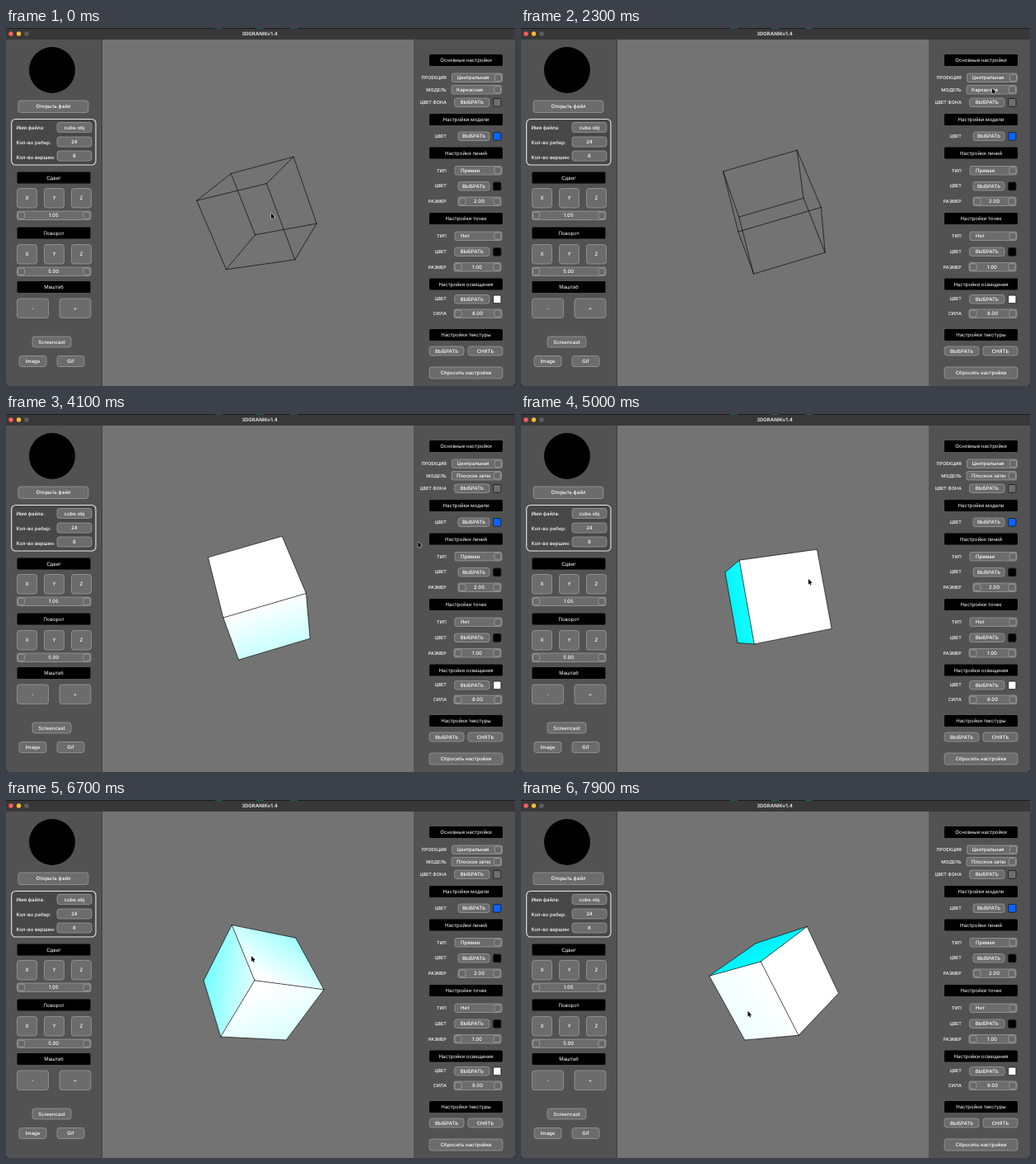
An HTML page with a canvas for the animation above (8000 ms loop, 618 by 434 pixels).

```html
<!DOCTYPE html>
<html lang="ru">
<head>
<meta charset="utf-8">
<title>3DGRANIKv1.4</title>
<style>
html, body { margin: 0; width: 100%; height: 100%; overflow: hidden; background: #1d1d1d; }
canvas { display: block; width: 618px; height: 434px; }
</style>
</head>
<body>
<canvas id="stage"></canvas>
<script>
const W = 618, H = 434, LOOP = 8000, STEP = 100;
const canvas = document.getElementById('stage');
const ctx = canvas.getContext('2d');
const ratio = window.devicePixelRatio || 1;
canvas.width = W * ratio;
canvas.height = H * ratio;
ctx.textRendering = 'geometricPrecision';

const POPUP_OPEN = 2500, POPUP_CLOSE = 3500;

// ---------- basic drawing ----------
function box(x0, y0, x1, y1, r, fill, line, width = 0.7) {
  ctx.beginPath();
  ctx.roundRect(x0, y0, x1 - x0, y1 - y0, r);
  if (fill) { ctx.fillStyle = fill; ctx.fill(); }
  if (line) { ctx.strokeStyle = line; ctx.lineWidth = width; ctx.stroke(); }
}

function disc(x, y, r, fill) {
  ctx.beginPath();
  ctx.arc(x, y, r, 0, 7);
  ctx.fillStyle = fill;
  ctx.fill();
}

function text(s, x, y, { size = 6, align = 'center', color = '#fff', weight = 500 } = {}) {
  ctx.font = `${weight} ${size}px Inter, "Open Sans", sans-serif`;
  ctx.textAlign = align;
  ctx.textBaseline = 'alphabetic';
  ctx.fillStyle = color;
  ctx.fillText(s, x, y + size * 0.36);
}

// ---------- widgets ----------
const FACE = '#6c6c6c', RIM = '#a3a3a3';

function button(s, x0, y0, x1, y1, r = 3) {
  box(x0, y0, x1, y1, r, FACE, RIM);
  text(s, (x0 + x1) / 2, (y0 + y1) / 2);
}

function heading(s, x0, y0, x1) {
  box(x0, y0, x1, y0 + 14, 1.5, '#000');
  text(s, (x0 + x1) / 2, y0 + 7, { weight: 400 });
}

function knob(x, y0, y1) {
  box(x, y0 + 1.2, x + 8, y1 - 1.2, 2, '#686868', '#a8a8a8', 0.7);
}

function spin(s, x0, y0, x1, y1) {
  box(x0, y0, x1, y1, 2, FACE, RIM);
  knob(x0 + 1, y0, y1);
  knob(x1 - 9, y0, y1);
  text(s, (x0 + x1) / 2 - 0.5, (y0 + y1) / 2);
}

function combo(s, x0, y0, x1, y1, textX, align = 'center') {
  box(x0, y0, x1, y1, 2, FACE, RIM);
  ctx.save();
  ctx.beginPath();
  ctx.rect(x0, y0, 588 - x0, y1 - y0);
  ctx.clip();
  text(s, textX, (y0 + y1) / 2, { align });
  ctx.restore();
  knob(x1 - 9, y0, y1);
}

function swatch(color, y) {
  box(591.7, y + 0.5, 601, y + 10.2, 1.5, color, '#1c1c1c', 0.9);
}

function label(s, y) {
  text(s, 534.7, y, { size: 5.4, align: 'right' });
}

// ---------- window parts ----------
function drawFrame() {
  ctx.fillStyle = '#525252';
  ctx.fillRect(0, 0, W, H);
  ctx.fillStyle = '#737373';
  ctx.fillRect(117, 14, 378, 420);
  ctx.fillStyle = '#3d3d3d';
  ctx.fillRect(116, 14, 1, 420);
  ctx.fillStyle = '#383838';
  ctx.fillRect(0, 0, W, 14);
  ctx.fillStyle = '#1d1d1d';
  ctx.fillRect(0, 0, W, 1);
  ctx.fillStyle = '#1c5a4c';
  for (const x of [254, 304, 345]) ctx.fillRect(x, 0, 9, 1);
  disc(6, 7, 2.7, '#fe5f57');
  disc(15.5, 7, 2.7, '#febc2e');
  disc(25, 7, 2.7, '#606060');
  text('3DGRANIKv1.4', 308, 7, { weight: 700, color: '#dcdcdc' });
}

function drawLeft() {
  disc(56, 51, 28, '#000');
  button('Открыть файл', 15, 88, 100, 102.5);

  box(6.7, 110.5, 109, 166, 5, '#474747', '#e8e8e8', 1.1);
  [['Имя файла:', 'cube.obj', 120.5, 114.5],
   ['Кол-во ребер:', '24', 138.5, 132],
   ['Кол-во вершин:', '8', 156.5, 149]].forEach(([name, value, y, top]) => {
    text(name, 12.5, y, { align: 'left' });
    button(value, 62, top, 104, top + 12);
  });

  [['Сдвиг', 174.5, '1.05', 222], ['Поворот', 241.5, '5.00', 290]].forEach(([name, top, value, spinTop]) => {
    heading(name, 13.5, top, 102.5);
    [...'XYZ'].forEach((s, i) => {
      const x = 13.5 + i * 33;
      button(s, x, spinTop - 27.5, x + 24, spinTop - 4);
    });
    spin(value, 13.5, spinTop, 103, spinTop + 10.5);
  });

  heading('Маштаб', 13.5, 307, 102.5);
  button('-', 13.5, 328, 51.5, 351.5);
  button('+', 65, 328, 103, 351.5);
  button('Screencast', 32, 374, 79, 387);
  button('Image', 16, 397.5, 49, 410.5);
  button('Gif', 62, 397.5, 95, 410.5);
}

function drawRight(flat) {
  [['Основные настройки', 32], ['Настройки модели', 104], ['Настройки линий', 144.5],
   ['Настройки точек', 224], ['Настройки освещения', 303.5], ['Настройки текстуры', 365]]
    .forEach(([s, y]) => heading(s, 514, y, 603));

  [['ПРОЕКЦИЯ', 60], ['МОДЕЛЬ', 75], ['ЦВЕТ ФОНА', 90], ['ЦВЕТ', 131], ['ТИП', 173],
   ['ЦВЕТ', 191.5], ['РАЗМЕР', 210], ['ТИП', 252], ['ЦВЕТ', 271], ['РАЗМЕР', 290],
   ['ЦВЕТ', 328.5], ['СИЛА', 346]].forEach(([s, y]) => label(s, y));

  combo('Центральная', 541.5, 55, 602.5, 65.5, 567);
  if (flat) combo('Плоское затенение', 541, 69.5, 601.5, 80, 547, 'left');
  else combo('Каркасная', 541, 69.5, 601.5, 80, 563);
  combo('Прямая', 545, 167.5, 602, 178, 552, 'left');
  combo('Нет', 545, 247, 602, 257.5, 552, 'left');

  [[544.5, 85, '#6f6f6f'], [549, 126, '#0a64ff'], [549, 186.5, '#000'],
   [544.5, 266, '#000'], [544.5, 323.5, '#fff']].forEach(([x, y, color]) => {
    button('ВЫБРАТЬ', x, y, 587, y + 10.5);
    swatch(color, y);
  });

  spin('2.00', 549, 205, 601, 215.5);
  spin('1.00', 544, 284.5, 601, 295);
  spin('8.00', 544, 341, 602, 351.5);
  button('ВЫБРАТЬ', 514, 386, 556, 397);
  button('СНЯТЬ', 561, 386, 603, 397);
  button('Сбросить настройки', 514, 411, 603, 425);
}

function drawPopup(hover) {
  box(536.5, 69, 597, 98, 2, '#2e2e2e', '#474747', 0.6);
  ctx.save();
  ctx.beginPath();
  ctx.rect(536.5, 69, 59.5, 29);
  ctx.clip();
  ctx.fillStyle = '#6b6b6b';
  ctx.fillRect(536.5, 72 + hover * 8.6, 60, 8.8);
  ['Каркасная', 'Плоское затенение', 'Мягкое затенение'].forEach((s, i) =>
    text(s, 548.5, 76.3 + i * 8.5, { align: 'left' }));
  ctx.restore();
  ctx.beginPath();
  ctx.moveTo(539.5, 76.5);
  ctx.lineTo(541.2, 78.7);
  ctx.lineTo(544.5, 73.8);
  ctx.strokeStyle = '#fff';
  ctx.lineWidth = 0.9;
  ctx.stroke();
}

// ---------- time tracks ----------
// Each key is [time, ...values]; values run linearly between keys.
function sample(keys, t) {
  let i = 0;
  while (i < keys.length - 2 && t >= keys[i + 1][0]) i++;
  const a = keys[i], b = keys[i + 1];
  const k = Math.min(1, Math.max(0, (t - a[0]) / (b[0] - a[0])));
  return a.slice(1).map((v, j) => v + (b[j + 1] - v) * k);
}

// Right axis and front axis of the cube.
const POSES = [
  [400, 0.863, -0.18, 0.472, -0.359, -0.89, 0.28],
  [1400, 0.958, -0.283, -0.045, -0.2, -0.678, 0.707],
  [1700, 0.958, -0.28, -0.045, -0.173, -0.586, 0.791],
  [4400, 0.958, -0.28, -0.045, -0.173, -0.586, 0.791],
  [5000, 0.945, -0.16, -0.29, 0.31, -0.09, 0.945],
  [6100, 0.966, 0.125, -0.225, 0.244, -0.696, 0.65],
  [7200, 0.691, 0.084, -0.714, 0.591, -0.69, 0.4945],
  [7900, 0.588, -0.498, -0.676, 0.682, -0.146, 0.698]
];

const POINTER = [
  [400, 322, 224.5], [1400, 356.5, 248], [1700, 358, 254], [2300, 572, 73],
  [2600, 572, 73], [3200, 545.5, 87], [3500, 547, 86], [4000, 553, 150],
  [4400, 342, 170], [5000, 349, 200], [6100, 336.5, 162], [7200, 266, 212], [7900, 275.5, 256]
];

// ---------- cube ----------
const HALF = 46, DEPTH = 520, CX = 308.5, CY = 224;
const dot = (a, b) => a[0] * b[0] + a[1] * b[1] + a[2] * b[2];
const scale = (a, k) => a.map(v => v * k);
const add = (...list) => list.reduce((a, b) => a.map((v, i) => v + b[i]));
const unit = a => scale(a, 1 / Math.hypot(...a));
const cross = (a, b) => [a[1] * b[2] - a[2] * b[1], a[2] * b[0] - a[0] * b[2], a[0] * b[1] - a[1] * b[0]];

function project(p) {
  const k = 1 / (1 - p[2] / DEPTH);
  return [CX + p[0] * k, CY + p[1] * k];
}

function cubeAxes(t) {
  const p = sample(POSES, t);
  const u = unit(p.slice(0, 3)), front = p.slice(3);
  const w = unit(add(front, scale(u, -dot(front, u))));
  return [u, cross(w, u), w];
}

// A face is visible when the eye lies in front of its plane.
const faces = n => n[2] * DEPTH > HALF;

function shade(s) {
  const red = Math.min(255, Math.max(0, (s - 0.32) / 0.3 * 255));
  const green = Math.min(255, 255 - (0.3 - s) * 200);
  return `rgb(${Math.round(red)},${Math.round(green)},255)`;
}

function faceFill(n) {
  const [x, y] = project(scale(n, HALF));
  const len = Math.hypot(n[0], n[1]) || 1;
  const reach = 52 * n[2];
  const dx = n[0] / len * reach, dy = n[1] / len * reach;
  const g = ctx.createLinearGradient(x + dx, y + dy, x - dx, y - dy);
  g.addColorStop(0, shade(n[2] - 0.06));
  g.addColorStop(1, shade(n[2] + 0.06));
  return g;
}

function drawCube(t, solid) {
  const axes = cubeAxes(t);
  const edges = new Path2D();
  axes.forEach((axis, i) => {
    const a = axes[(i + 1) % 3], b = axes[(i + 2) % 3];
    const corner = (n, j, k) => project(scale(add(n, scale(a, j), scale(b, k)), HALF));
    const square = [[-1, -1], [1, -1], [1, 1], [-1, 1]];

    for (const sign of [1, -1]) {
      const n = scale(axis, sign);
      if (!solid || !faces(n)) continue;
      ctx.beginPath();
      square.forEach(([j, k]) => ctx.lineTo(...corner(n, j, k)));
      ctx.fillStyle = faceFill(n);
      ctx.fill();
    }

    // The four edges that run along this axis.
    for (const [j, k] of square) {
      if (solid && !faces(scale(a, j)) && !faces(scale(b, k))) continue;
      edges.moveTo(...corner(scale(axis, -1), j, k));
      edges.lineTo(...corner(axis, j, k));
    }
  });
  ctx.lineWidth = 0.65;
  ctx.lineCap = 'round';
  ctx.strokeStyle = '#000';
  ctx.stroke(edges);
}

function drawPointer(t) {
  const [x, y] = sample(POINTER, t);
  ctx.beginPath();
  [[0, 0], [0, 6.6], [1.5, 5.3], [2.5, 7.6], [3.5, 7.1], [2.5, 5], [4.5, 4.8]]
    .forEach(([dx, dy]) => ctx.lineTo(x + dx, y + dy));
  ctx.closePath();
  ctx.strokeStyle = '#ddd';
  ctx.lineWidth = 0.9;
  ctx.stroke();
  ctx.fillStyle = '#000';
  ctx.fill();
}

// ---------- loop ----------
function draw(t) {
  const solid = t >= POPUP_CLOSE;
  ctx.setTransform(ratio, 0, 0, ratio, 0, 0);
  ctx.clearRect(0, 0, W, H);
  ctx.save();
  ctx.beginPath();
  ctx.roundRect(0, 0, W, H, [0, 0, 4, 4]);
  ctx.clip();
  drawFrame();
  drawLeft();
  drawRight(solid);
  drawCube(t, solid);
  if (t >= POPUP_OPEN && !solid) drawPopup(t < 2900 ? 0 : 1);
  drawPointer(t);
  ctx.restore();
}

const start = performance.now();
let shown = -1;
function tick() {
  const t = Math.floor((performance.now() - start) % LOOP / STEP) * STEP;
  if (t !== shown) draw(shown = t);
  requestAnimationFrame(tick);
}
tick();
</script>
</body>
</html>
```
